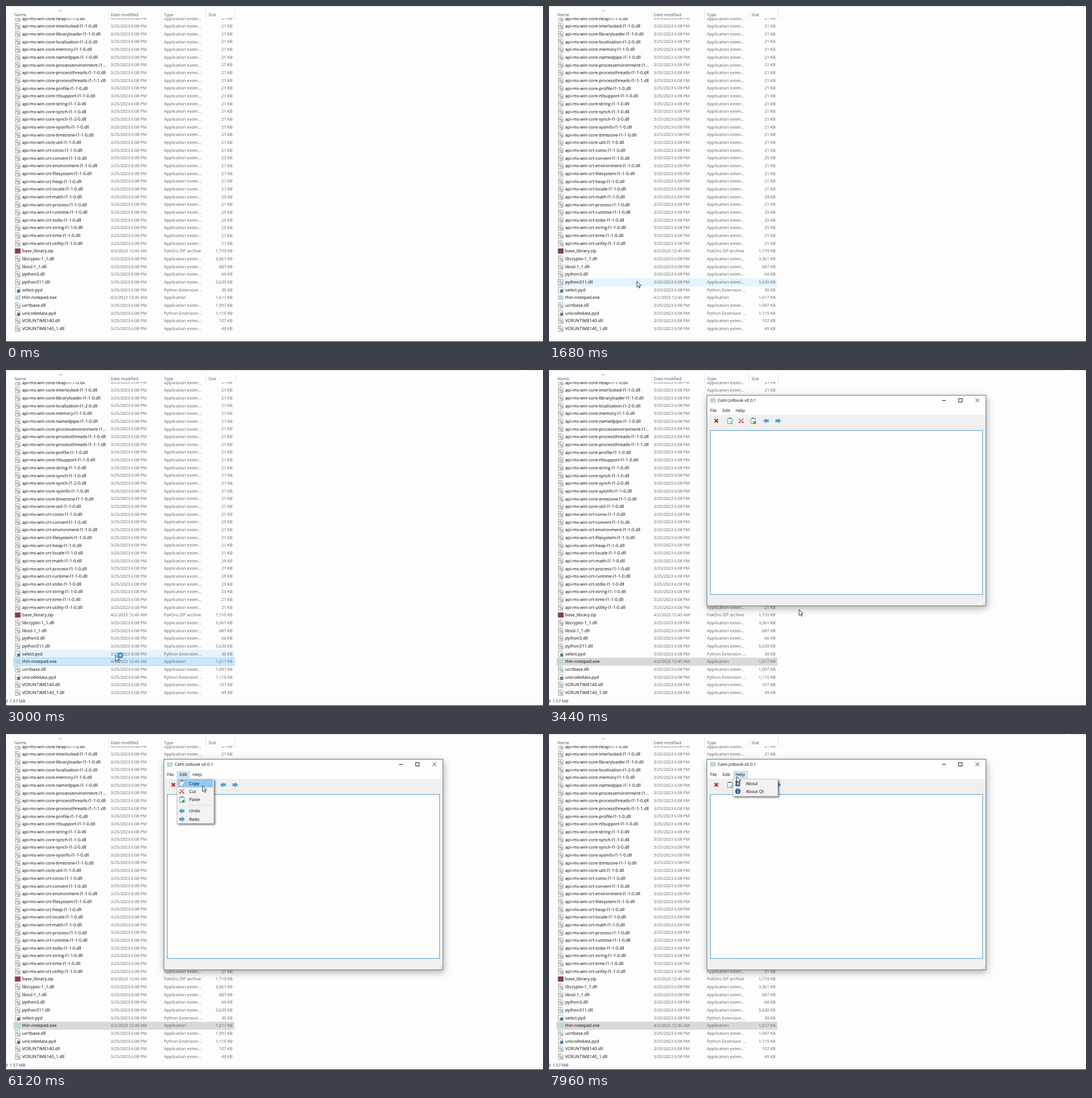
These frames come from a looping animation (947x592 px, 8 s). An HTML page with a canvas:

```html
<!DOCTYPE html>
<html lang="en">
<head>
<meta charset="utf-8">
<title>File list and notepad</title>
<style>
html, body { margin: 0; width: 100%; height: 100%; overflow: hidden; background: #fdfdfd; }
canvas { display: block; }
</style>
</head>
<body>
<canvas id="stage" width="947" height="592"></canvas>
<script>
const ctx = document.getElementById('stage').getContext('2d');
const LOOP = 8000;
const ROW_TOP = 35.5, ROW_STEP = 13.663;
const APP_ROW = 35;
const SELECT_AT = 2200, BUSY_AT = 2320, WINDOW_AT = 3040;
const FILE_AT = 4400, EDIT_AT = 5080, HELP_AT = 7560;
const INK = '#080808', MUTED = '#626262';

// ---- file list data ----
const core = ['heap', 'interlocked', 'libraryloader', 'localization', 'memory', 'namedpipe',
  'processenvironment', 'processthreads', 'processthreads', 'profile', 'rtlsupport', 'string',
  'synch', 'synch', 'sysinfo', 'timezone', 'util'];
const crt = ['conio', 'convert', 'environment', 'filesystem', 'heap', 'locale', 'math',
  'process', 'runtime', 'stdio', 'string', 'time', 'utility'];
const crtSizes = { convert: 25, math: 29, runtime: 25, stdio: 25, string: 25 };
const dll = (name, size) => ({ name, size, date: '3/25/2023 6:08 PM', type: 'Application exten...', icon: 'dll' });
const pyd = (name, size) => ({ ...dll(name, size), type: 'Python Extension ...', icon: 'pyd' });
const built = (name, size, type, icon) => ({ name, size, date: '4/2/2023 12:45 AM', type, icon });

function coreName(part, i) {
  if (part === 'processenvironment') return 'api-ms-win-core-processenvironment-l1...';
  const repeated = core[i - 1] === part;
  const version = part === 'localization' || (part === 'synch' && repeated) ? 'l1-2-0'
    : repeated ? 'l1-1-1' : 'l1-1-0';
  return `api-ms-win-core-${part}-${version}.dll`;
}

const files = [
  ...core.map((part, i) => dll(coreName(part, i), '21')),
  ...crt.map(part => dll(`api-ms-win-crt-${part}-l1-1-0.dll`, crtSizes[part] || 21)),
  built('base_library.zip', '1,710', 'PakOro ZIP archive', 'zip'),
  dll('libcrypto-1_1.dll', '3,361'), dll('libssl-1_1.dll', '687'),
  dll('python3.dll', '66'), dll('python311.dll', '5,630'), pyd('select.pyd', '30'),
  built('thin-notepad.exe', '1,617', 'Application', 'app'),
  dll('ucrtbase.dll', '1,097'), pyd('unicodedata.pyd', '1,115'),
  dll('VCRUNTIME140.dll', '107'), dll('VCRUNTIME140_1.dll', '49')
];

// ---- pointer path: time, x, y ----
const path = [
  [700, 420, 600], [1450, 150, 491], [1680, 155, 485], [2000, 168, 511], [2900, 168, 511],
  [3440, 441, 422], [3700, 443, 414], [4350, 284, 75], [4950, 284, 75], [5200, 308, 74],
  [5500, 312, 76], [5900, 345, 90], [6200, 347, 91], [6500, 346, 104], [6750, 345, 118],
  [7000, 345, 138], [7250, 345, 151], [7620, 331, 75]
];

function pointerAt(t) {
  const next = path.findIndex(p => p[0] > t);
  if (next === 0) return { x: path[0][1], y: path[0][2] };
  if (next < 0) { const [, x, y] = path[path.length - 1]; return { x, y }; }
  const [t0, x0, y0] = path[next - 1], [t1, x1, y1] = path[next];
  const u = (t - t0) / (t1 - t0), k = u * u * (3 - 2 * u);
  return { x: x0 + (x1 - x0) * k, y: y0 + (y1 - y0) * k };
}

// ---- drawing helpers ----
function rect(x, y, w, h, fill, stroke) {
  if (fill) { ctx.fillStyle = fill; ctx.fillRect(x, y, w, h); }
  if (stroke) { ctx.strokeStyle = stroke; ctx.lineWidth = 1; ctx.strokeRect(x + .5, y + .5, w - 1, h - 1); }
}

function text(str, x, y, size, color, align = 'left') {
  ctx.font = `${size}px "Open Sans", "Noto Sans", sans-serif`;
  ctx.textAlign = align;
  ctx.fillStyle = color;
  ctx.fillText(str, x, y + size * .36);
}

function trace(points, close) {
  ctx.beginPath();
  points.forEach(([x, y]) => ctx.lineTo(x, y));
  if (close) ctx.closePath();
}

function line(points, color, width = 1) {
  trace(points);
  ctx.strokeStyle = color;
  ctx.lineWidth = width;
  ctx.stroke();
}

function polygon(points, fill, stroke, width = .8) {
  trace(points, true);
  ctx.fillStyle = fill;
  ctx.fill();
  if (stroke) { ctx.strokeStyle = stroke; ctx.lineWidth = width; ctx.stroke(); }
}

function disc(x, y, r, fill) {
  ctx.beginPath();
  ctx.arc(x, y, r, 0, Math.PI * 2);
  ctx.fillStyle = fill;
  ctx.fill();
}

function cross(x, y, r, color, width) {
  line([[x - r, y - r], [x + r, y + r]], color, width);
  line([[x + r, y - r], [x - r, y + r]], color, width);
}

function withShadow(blur, dx, dy, color, draw) {
  ctx.save();
  Object.assign(ctx, { shadowBlur: blur, shadowOffsetX: dx, shadowOffsetY: dy, shadowColor: color });
  draw();
  ctx.restore();
}

// ---- icons, each centred on x, y ----
function page(x, y) {
  polygon([[x - 4, y - 5], [x + 2, y - 5], [x + 4, y - 3], [x + 4, y + 5], [x - 4, y + 5]], '#f8f8f8', '#8a8a8a');
}

function clipboard(x, y) {
  rect(x - 4.5, y - 4.5, 9, 10, '#f5f8fa', '#7690a3');
  rect(x - 2, y - 5.5, 4, 2, '#5d7688');
}

function arrow(x, y, dir) {
  polygon([[5, 0], [.5, -4], [.5, -2], [-5, -2], [-3.5, 0], [-5, 2], [.5, 2], [.5, 4]]
    .map(([px, py]) => [x + px * dir, y + py]), '#45a5dd', '#3286bd', .5);
}

const icons = {
  dll(x, y) {
    page(x, y);
    ctx.beginPath();
    ctx.arc(x - .8, y - .7, 1.6, 0, 7);
    ctx.moveTo(x + 3, y + 2);
    ctx.arc(x + 1.5, y + 2, 1.5, 0, 7);
    ctx.strokeStyle = '#8a9298';
    ctx.lineWidth = 1;
    ctx.stroke();
  },
  pyd(x, y) { page(x, y); rect(x - 1, y - .5, 5, 5, '#3e76a8'); },
  zip(x, y) { rect(x - 5, y - 4.5, 10, 9, '#873e50'); },
  app(x, y) { rect(x - 5, y - 4, 10, 8, '#bdd6da'); },
  quit(x, y) { cross(x, y, 3, '#c81e1e', 2.3); },
  copy(x, y) { clipboard(x, y); rect(x + 1, y + 1, 4, 4, '#8fc4e6'); },
  cut(x, y) {
    cross(x, y, 3.8, '#d66a6a', 1.6);
    disc(x - 3, y + 3, 1.4, '#cf4b4b');
    disc(x + 3, y + 3, 1.4, '#cf4b4b');
  },
  paste(x, y) { clipboard(x, y); rect(x + .5, y + 1, 4.5, 4.5, '#47a447'); },
  undo(x, y) { arrow(x, y, -1); },
  redo(x, y) { arrow(x, y, 1); },
  about(x, y) { rect(x - 4, y - 5, 8, 10, '#4c7899', '#34566f'); rect(x - 1, y - 2, 3, 4, '#c8dbe7'); },
  info(x, y) {
    disc(x, y, 4.8, '#2756b8');
    rect(x - .6, y - 3, 1.3, 1.3, '#fff');
    rect(x - .6, y - 1, 1.3, 4, '#fff');
  }
};

// ---- scene parts ----
function drawList(t, pointer) {
  const overWindow = t >= WINDOW_AT && pointer.x >= 278 && pointer.y >= 44 && pointer.y <= 416;
  const inList = pointer.x > 13 && pointer.x < 402 && !overWindow;
  const hovered = inList ? Math.round((pointer.y - ROW_TOP) / ROW_STEP) : -1;

  files.forEach((file, i) => {
    const row = i - 1, y = ROW_TOP + row * ROW_STEP, top = Math.round(y - 6.8);
    if (row === APP_ROW && t >= SELECT_AT) {
      if (t < WINDOW_AT) rect(13, top, 390, 14, '#cce8ff', '#99d1ff');
      else rect(13, top, 390, 14, '#d9d9d9');
    } else if (row === hovered && row >= 0) rect(13, top, 390, 14, '#e5f3ff');
    icons[file.icon](20.7, y);
    text(file.name, 28.5, y, 7.66, INK);
    text(file.date, 184.5, y, 7.28, MUTED);
    text(file.type, 278.5, y, 7.46, MUTED);
    text(file.size + ' KB', 399.5, y, 7.33, MUTED, 'right');
  });

  rect(0, 0, 947, 21, '#fdfdfd');
  rect(0, 0, 912, 1, '#dedede');
  rect(919, 0, 28, 1, '#dedede');
  rect(0, 20, 1, 570, '#eeeeee');
  [181, 274, 352, 404].forEach(x => rect(x, 6, 1, 18, '#e4e4e4'));
  [['Name', 15], ['Date modified', 184.5], ['Type', 278.5], ['Size', 357]]
    .forEach(([label, x]) => text(label, x, 15, 7.42, '#43566f'));
  line([[93.5, 9.5], [96, 7], [98.5, 9.5]], '#777', .9);

  if (t >= SELECT_AT) {
    text('d', -1.5, 583, 7.4, '#1e395b');
    text('1.57 MB', 6.5, 583, 7.3, '#1e395b');
  }
  rect(0, 591, 947, 1, '#151515');
}

const menus = [
  { label: 'File', x: 284, tab: [279, 21], box: [281, 79, 61, 17], items: [['Quit', 'quit', 87]] },
  { label: 'Edit', x: 306, tab: [301, 23], box: [301, 79, 66, 79], separator: 125,
    items: [['Copy', 'copy', 87], ['Cut', 'cut', 101], ['Paste', 'paste', 115.5], ['Undo', 'undo', 135.5], ['Redo', 'redo', 150]] },
  { label: 'Help', x: 329, tab: [325, 26], box: [324, 79, 80, 31], items: [['About', 'about', 87], ['About Qt', 'info', 101]] }
];

function drawMenu(menu, pointer) {
  const [x, y, w, h] = menu.box;
  withShadow(3, 2, 2, 'rgba(0,0,0,.5)', () => rect(x, y, w, h, '#f2f2f2'));
  rect(x, y, w, h, null, '#c0c0c0');
  if (menu.separator) rect(x + 21, menu.separator, w - 24, 1, '#d9d9d9');
  const iconX = x + (menu.label === 'File' ? 6.5 : 9);
  const labelX = x + (menu.label === 'File' ? 20 : menu.label === 'Edit' ? 22 : 23);
  menu.items.forEach(([label, icon, itemY]) => {
    if (pointer.y > 79 && Math.abs(pointer.y - itemY) <= 7.2) rect(x + 2, itemY - 7, w - 4, 14, '#91c9f7');
    icons[icon](iconX, itemY);
    text(label, labelX, itemY, 7.6, INK);
  });
}

function drawWindow(t, pointer) {
  withShadow(12, 1, 4, 'rgba(0,0,0,.32)', () => rect(278, 44, 493, 372, '#f0f0f0'));
  rect(278, 44, 493, 35, '#fefefe');
  rect(278, 99, 493, 1, '#e9e7de');
  rect(278, 44, 493, 372, null, '#707478');
  icons.app(289, 53.5);
  text('Calm Jotbook v0.0.1', 297.5, 53.5, 7.33, INK);
  rect(693, 53, 7, 1, '#222');
  rect(722, 50, 7, 7, null, '#222');
  cross(755.5, 53.5, 3.3, '#222', .9);

  const open = t < FILE_AT ? -1 : t < EDIT_AT ? 0 : t < HELP_AT ? 1 : 2;
  menus.forEach((menu, i) => {
    if (i === open) rect(menu.tab[0], 65, menu.tab[1], 13, '#cce8ff', '#b4dcfa');
    text(menu.label, menu.x, 71.5, 7.6, INK);
  });

  [['quit', 295], ['copy', 319], ['cut', 339], ['paste', 360], ['undo', 383], ['redo', 404]]
    .forEach(([name, x]) => icons[name](x, 89.5));
  rect(284, 106, 481, 290, '#fdfdfd', '#5a9fd4');
  for (let i = 0; i < 3; i++) {
    for (let j = 0; j <= i; j++) rect(764 + i * 2, 413 - j * 2, 1, 1, '#b4b4b4');
  }
  if (open >= 0) drawMenu(menus[open], pointer);
}

function drawPointer(t, { x, y }) {
  const outline = [[0, 0], [0, 10.5], [2.4, 8.3], [4, 12], [5.7, 11.3], [4.1, 7.7], [7.4, 7.7]];
  polygon(outline.map(([px, py]) => [x + px, y + py]), '#fff', '#222', .9);
  if (t < BUSY_AT || t >= WINDOW_AT) return;
  disc(x + 8.5, y, 5.2, '#2f91d8');
  disc(x + 8.5, y, 2.2, '#b9e2fa');
}

function draw(t) {
  const pointer = pointerAt(t);
  rect(0, 0, 947, 592, '#fdfdfd');
  drawList(t, pointer);
  if (t >= WINDOW_AT) {
    ctx.globalAlpha = Math.min(1, (t - WINDOW_AT + 40) / 160);
    drawWindow(t, pointer);
    ctx.globalAlpha = 1;
  }
  drawPointer(t, pointer);
}

ctx.textRendering = 'geometricPrecision';
const start = performance.now();
function tick() {
  draw((performance.now() - start) % LOOP);
  requestAnimationFrame(tick);
}
tick();
</script>
</body>
</html>
```
